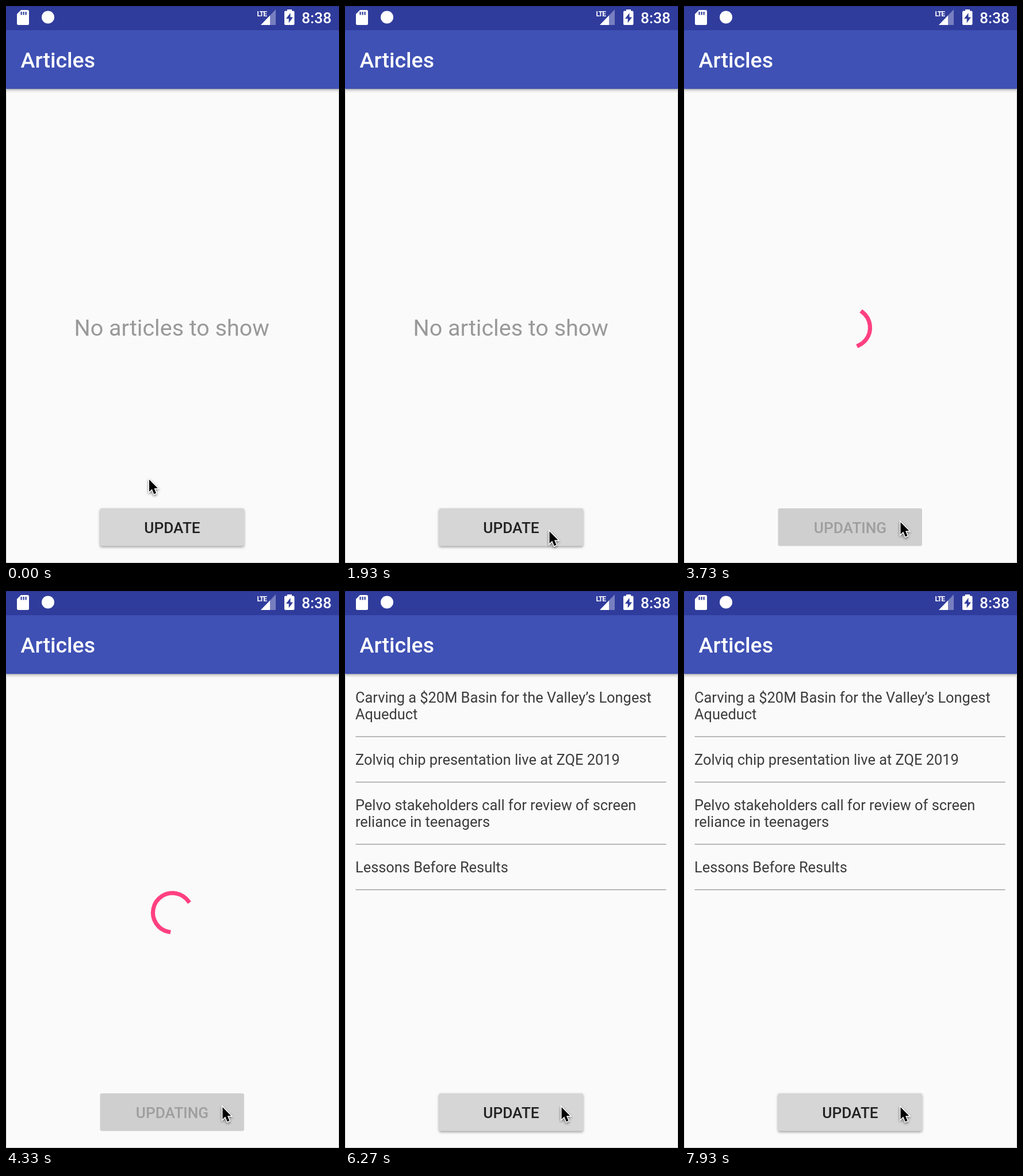
Animation of 579x968 px, one loop 8000 ms. Source, as an HTML page with a canvas:

```html
<!DOCTYPE html>
<html lang="en">
<head>
<meta charset="utf-8">
<title>Articles</title>
<style>
  html, body { margin: 0; width: 100%; height: 100%; overflow: hidden; background: #fafafa; }
  canvas { display: block; width: 100%; height: 100%; }
</style>
</head>
<body>
<canvas id="stage" width="579" height="968"></canvas>
<script>
const ctx = document.getElementById('stage').getContext('2d');
const W = 579, H = 968, LOOP = 8000;
const PRESS = 3270, UPDATING = 3470, SPIN = 3515, SETTLED = 4400, LOADED = 5130;

// Cursor tip: [time, x, y]
const cursorPath = [
  [0, 249, 823], [70, 251, 825], [650, 352, 928], [930, 356, 924],
  [1070, 355.5, 913], [2670, 355.5, 913], [2950, 376.5, 897], [LOOP, 376.5, 897]
];

// Headline lines: [baseline, text]
const headlines = [
  [194, 'Carving a $20M Basin for the Valley’s Longest'],
  [223, 'Aqueduct'],
  [302, 'Zolviq chip presentation live at ZQE 2019'],
  [381, 'Pelvo stakeholders call for review of screen'],
  [410, 'reliance in teenagers'],
  [489, 'Lessons Before Results']
];
const dividers = [253, 332, 440, 519];

const clamp = v => Math.min(1, Math.max(0, v));
const smooth = v => v * v * (3 - 2 * v);

function rect(x, y, w, h, color) {
  ctx.fillStyle = color;
  ctx.fillRect(x, y, w, h);
}

function poly(points, color) {
  ctx.beginPath();
  points.forEach(([x, y]) => ctx.lineTo(x, y));
  ctx.closePath();
  ctx.fillStyle = color;
  ctx.fill();
}

function text(str, x, y, size, color, weight = 400, align = 'left') {
  ctx.font = `${weight} ${size}px Roboto, sans-serif`;
  ctx.textAlign = align;
  ctx.fillStyle = color;
  ctx.fillText(str, x, y);
}

function shadow(color, blur, dy) {
  ctx.shadowColor = color;
  ctx.shadowBlur = blur;
  ctx.shadowOffsetY = dy;
}

function drawStatusBar() {
  rect(0, 0, W, 42, '#303c9c');
  rect(0, 0, W, 1, '#2a358a');

  // Memory card
  ctx.beginPath();
  ctx.moveTo(26, 7);
  ctx.lineTo(37.5, 7);
  ctx.quadraticCurveTo(40, 7, 40, 9.5);
  ctx.lineTo(40, 30.5);
  ctx.quadraticCurveTo(40, 33, 37.5, 33);
  ctx.lineTo(21.5, 33);
  ctx.quadraticCurveTo(19, 33, 19, 30.5);
  ctx.lineTo(19, 14);
  ctx.closePath();
  ctx.fillStyle = '#fff';
  ctx.fill();
  for (let i = 0; i < 3; i++) rect(25.5 + i * 4, 10, 2.2, 5.5, '#303c9c');

  ctx.beginPath();
  ctx.arc(73, 19.5, 11, 0, Math.PI * 2);
  ctx.fillStyle = '#fff';
  ctx.fill();

  // Signal
  poly([[443, 33], [469, 33], [469, 6]], '#777fbf');
  poly([[443, 33], [459, 33], [459, 16.5]], '#fff');
  ctx.letterSpacing = '-1px';
  text('LTE', 436.5, 17.5, 12, '#fff', 700);
  ctx.letterSpacing = '0px';

  // Battery
  rect(489, 6, 8, 4, '#fff');
  ctx.beginPath();
  ctx.roundRect(484, 8.5, 17.5, 24.5, 2);
  ctx.fill();
  poly([[494.5, 12], [487, 22], [491.7, 22], [491.7, 29.5], [499, 19.5], [494.5, 19.5]], '#303c9c');

  text('8:38', 514, 29.5, 26.4, '#fff', 500);
}

function drawToolbar() {
  const fade = ctx.createLinearGradient(0, 144, 0, 151);
  fade.addColorStop(0, 'rgba(0,0,0,.32)');
  fade.addColorStop(0.4, 'rgba(0,0,0,.11)');
  fade.addColorStop(1, 'rgba(0,0,0,0)');
  rect(0, 144, W, 7, fade);
  rect(0, 42, W, 102, '#3f51b5');
  text('Articles', 25.5, 107, 37.4, '#fff', 500);
}

function drawList() {
  headlines.forEach(([y, str]) => text(str, 18, y, 25.4, '#3c3c3c'));
  dividers.forEach(y => rect(18.5, y - 0.5, 540, 1.3, '#979797'));
}

// Cubic timing curve through x1, x2 and end x, with y rising 0 to 1
function ease(p, x1, x2, end) {
  if (p >= end) return 1;
  let lo = 0, hi = 1;
  for (let i = 0; i < 24; i++) {
    const s = (lo + hi) / 2, r = 1 - s;
    const x = 3 * x1 * s * r * r + 3 * x2 * s * s * r + end * s * s * s;
    if (x < p) lo = s; else hi = s;
  }
  return smooth(lo);
}

function drawSpinner(age) {
  const p = (age % 1333) / 1333;
  const tail = p < 0.5 ? 0 : 0.75 * ease(p - 0.5, 0.2, 0.1, 0.5);
  const head = 0.75 * ease(p, 0.2, 0.1, 0.5);
  const turn = age / 6665 * 2 + p * 0.25 - 0.25;
  ctx.beginPath();
  ctx.arc(289.5, 559, 34, (turn + tail) * Math.PI * 2, (turn + head + 0.0003) * Math.PI * 2);
  ctx.lineWidth = 7.2;
  ctx.lineCap = 'square';
  ctx.strokeStyle = '#ff4081';
  ctx.stroke();
}

function drawButton(t, busy) {
  const press = clamp((t - PRESS) / (UPDATING - PRESS));
  const pressing = press > 0 && t < UPDATING;
  ctx.save();
  if (!busy) {
    const lift = pressing ? clamp(press * 2) : 0;
    shadow('rgba(0,0,0,.36)', 4 + 5 * lift, 2 + 3 * lift);
  }
  ctx.beginPath();
  ctx.roundRect(163.5, 873, 250.5, 65.5, 3);
  ctx.fillStyle = busy && t < SETTLED ? '#cfcfcf' : '#d6d6d6';
  ctx.fill();
  shadow('transparent', 0, 0);
  if (pressing) {
    ctx.clip();
    ctx.beginPath();
    ctx.arc(376, 897, 215 * press, 0, Math.PI * 2);
    ctx.fillStyle = '#cfcfcf';
    ctx.fill();
  }
  ctx.restore();
  text(busy ? 'UPDATING' : 'UPDATE', 289, 916, 26.2, busy ? 'rgba(33,33,33,.28)' : '#212121', 500, 'center');
}

function drawCursor(t) {
  const i = Math.max(1, cursorPath.findIndex(k => k[0] > t));
  const [t0, x0, y0] = cursorPath[i - 1], [t1, x1, y1] = cursorPath[i];
  const u = smooth(clamp((t - t0) / (t1 - t0)));
  ctx.save();
  ctx.translate(x0 + (x1 - x0) * u, y0 + (y1 - y0) * u);
  const arrow = [[0, 0], [0, 21], [4.8, 16.6], [8.3, 25.2], [12, 23.6], [8.5, 15.2], [14.8, 15]];
  shadow('rgba(0,0,0,.4)', 4, 2);
  poly(arrow, '#fff');
  ctx.lineWidth = 3;
  ctx.lineJoin = 'miter';
  ctx.lineCap = 'butt';
  ctx.strokeStyle = '#fff';
  ctx.stroke();
  shadow('transparent', 0, 0);
  poly(arrow, '#000');
  ctx.restore();
}

function draw(t) {
  const busy = t >= UPDATING && t < LOADED;
  rect(0, 0, W, H, '#fafafa');
  if (t >= LOADED) drawList();
  else if (!busy) text('No articles to show', 288.3, 573, 39.5, '#999', 400, 'center');
  else if (t >= SPIN) drawSpinner(t - SPIN);
  drawButton(t, busy);
  drawToolbar();
  drawStatusBar();

  // Window edge
  rect(0, 144, 1, H - 144, '#d2d2d2');
  rect(W - 1, 144, 1, H - 144, '#d2d2d2');
  rect(0, H - 1, W, 1, '#cacaca');
  drawCursor(t);
}

const start = performance.now();
function frame() {
  draw((performance.now() - start) % LOOP);
  requestAnimationFrame(frame);
}
frame();
</script>
</body>
</html>
```
